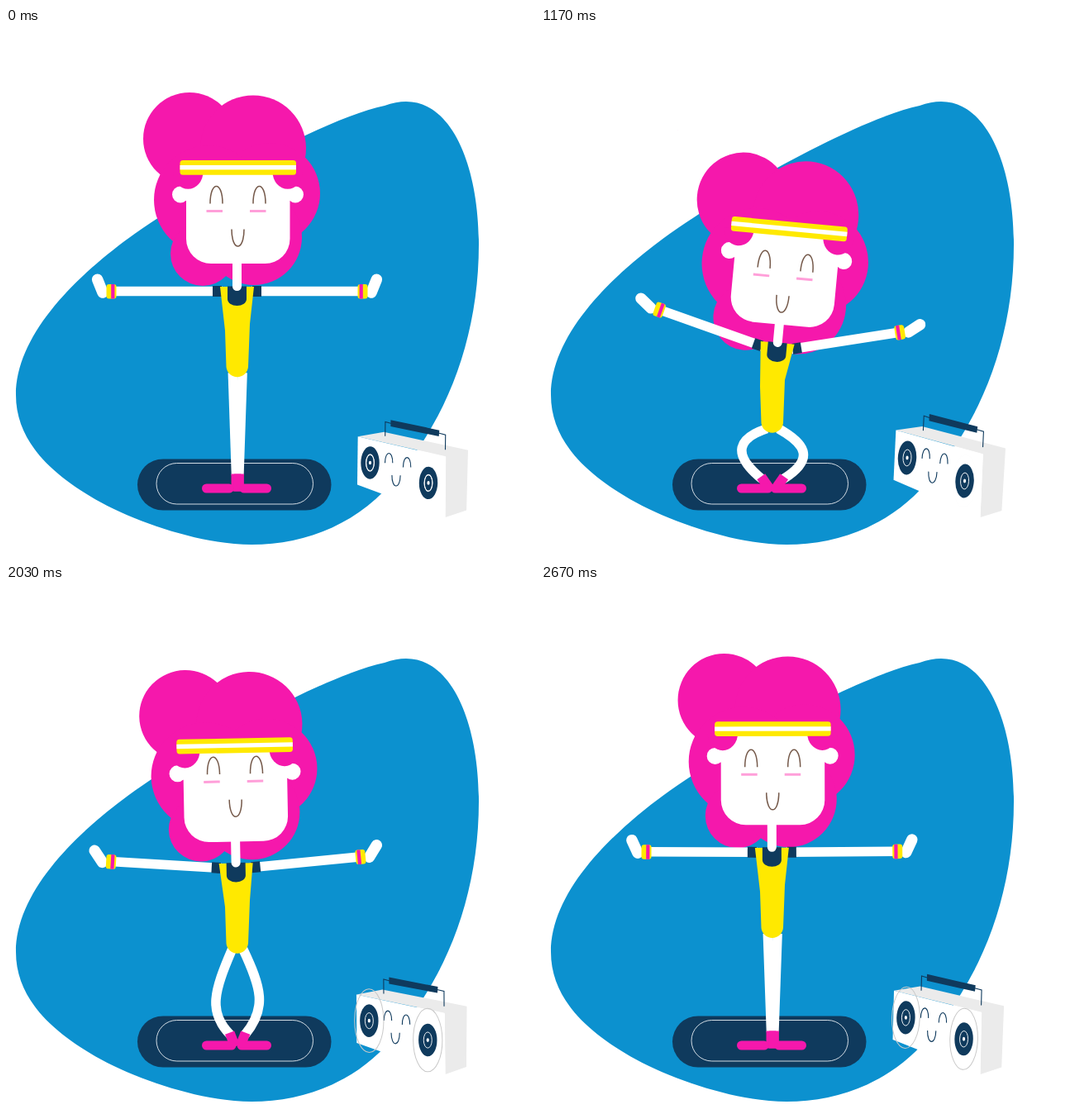
An HTML page that plays this animation: 640 px wide and 640 px high, repeating every 2730 ms.

```html
<!DOCTYPE html>
<html lang="en">
<head>
<meta charset="utf-8">
<title>Plié workout</title>
<style>
  html, body { margin: 0; width: 100%; height: 100%; overflow: hidden; background: #fff; }
  svg { display: block; width: 100vw; height: 100vh; }
  .pink { fill: #f518ac; }
  .navy { fill: #0f3a5d; }
  .yellow { fill: #ffe900; }
  .white { fill: #fff; }
  .line { fill: none; }
  .brown { stroke: #75594a; stroke-width: 1.5; }
  .thin { stroke: #0f3a5d; stroke-width: 1.1; }
  .limb { stroke: #fff; stroke-width: 11.5; fill: none; }
  .shoe { stroke: #f518ac; fill: none; }
</style>
</head>
<body>
<svg viewBox="0 0 640 640">
  <defs>
    <path id="eye" class="line" d="M0 21C0 -7 15 -7 15 21"/>
    <g id="speaker">
      <ellipse class="navy" rx="11.2" ry="20"/>
      <ellipse class="line" rx="5" ry="9.7" stroke="#fff" stroke-width=".9"/>
      <ellipse class="white" rx="1.6" ry="2.4"/>
      <ellipse id="ring" class="line"/>
    </g>
    <g id="arm">
      <path class="limb" d="M262 318.5H127"/>
      <rect class="navy" x="250" y="312" width="11" height="13"/>
      <path id="hand" d="M117 320H100" stroke="#fff" stroke-width="13.5" stroke-linecap="round"/>
      <rect class="yellow" x="121.5" y="310" width="12" height="17.5" rx="3"/>
      <rect class="pink" x="127.2" y="310" width="4.2" height="17.5"/>
    </g>
    <g id="side">
      <g class="white"><circle cx="211" cy="201.5" r="10"/><rect x="211" y="193" width="12" height="16"/></g>
      <path class="pink" d="M202 174a18 20.5 0 0 0 36.5 0Z"/>
    </g>
  </defs>

  <rect class="white" width="640" height="640"/>
  <path fill="#0c91cf" d="M484 89C540 89 572 168 572 262C572 372 535 470 474 541C430 598 365 625 297 625C240 625 165 601 115 574C55 541 12 500 12 444C12 362 104 281 186 228.5C250 186 390 108 458 94Q472 89 484 89Z"/>
  <rect class="navy" x="159" y="521.5" width="234.5" height="62" rx="31"/>
  <rect class="line" x="182" y="526.5" width="189.5" height="49.5" rx="24.7" stroke="#e8eef2" stroke-width=".9"/>

  <g id="radio">
    <path fill="#ebebeb" d="M424.5 494L456 488L558 509L557 583L531.5 592L531 517Z"/>
    <path class="white" d="M424.5 494L531.3 517.5L531.5 592L424.5 553Z"/>
    <path class="line thin" d="M457.5 493V475.5L465 477.5M522 488.5L530.5 490.5V509"/>
    <path class="navy" d="M464 473L523 485L522.5 492.5L464 481Z"/>
    <path class="line thin" d="M457.7 526C457.7 510 467 510 467 526M479.7 531C479.7 515 489 515 489 531M466.3 541C466.3 558.5 476.5 558.5 476.5 541"/>
    <use href="#speaker" x="439.7" y="526"/>
    <use href="#speaker" x="510.5" y="550"/>
  </g>

  <g id="legs"></g>

  <g class="upper">
    <g class="head">
      <g id="hair" class="pink">
        <circle cx="222" cy="134" r="56"/>
        <circle cx="299" cy="145.5" r="64"/>
        <circle cx="319" cy="200" r="61"/>
        <circle cx="245" cy="208" r="66"/>
        <circle cx="238" cy="273" r="39"/>
        <circle cx="300" cy="253" r="58"/>
      </g>
    </g>
    <use href="#arm"/>
    <use href="#arm" transform="translate(559 0) scale(-1 1)"/>
  </g>

  <path id="suit" class="yellow"/>

  <g class="upper">
    <path class="navy" d="M268 312.5V328a11.5 8 0 0 0 23 0V312.5Z"/>
    <path d="M279.5 270V312.5" stroke="#fff" stroke-width="11" stroke-linecap="round"/>
    <g class="head">
      <path class="white" d="M218 168H343.5V255a30 30 0 0 1 -30 30H248a30 30 0 0 1 -30 -30Z"/>
      <use href="#side"/>
      <use href="#side" transform="translate(561 0) scale(-1 1)"/>
      <rect class="yellow" x="210.5" y="160" width="140.5" height="17.7" rx="3.5"/>
      <rect class="white" x="210.5" y="166" width="140.5" height="5.4"/>
      <g id="face">
        <g class="brown">
          <use href="#eye" x="247" y="191"/>
          <use href="#eye" x="299" y="191"/>
          <path class="line" d="M273 243C273 270.5 288 270.5 288 243"/>
        </g>
        <path d="M242.5 221H262M295 221H314.5" stroke="#ff9fd9" stroke-width="3"/>
      </g>
    </g>
  </g>
</svg>
<script>
const LOOP = 2730, HALF = LOOP / 2, BEAT = HALF / 2, TAU = 2 * Math.PI;
const $ = s => document.querySelector(s);
const clamp = (v, a = 0, b = 1) => Math.min(b, Math.max(a, v));
const mix = (a, b, k) => a + (b - a) * k;
const wave = (t, period) => Math.sin(TAU * t / period);
const set = (el, attrs) => { for (const k in attrs) el.setAttribute(k, attrs[k]); };
const move = (el, transform) => set(el, { transform });

// Cubic ease in and out between two times.
function ease(t, from, to) {
  const u = clamp((t - from) / (to - from));
  return u < 0.5 ? 4 * u ** 3 : 1 - 4 * (1 - u) ** 3;
}

// One stretch upwards, then one squat, in each half of the loop.
function bodyY(t) {
  const p = (t + LOOP) % HALF;
  const stretch = p < 570 ? Math.sin(Math.PI * p / 570) ** 2 : 0;
  return 84 * (ease(p, 530, 860) - ease(p, 1045, 1390)) - 22 * stretch;
}

const SVG = 'http://www.w3.org/2000/svg';
const uppers = document.querySelectorAll('.upper'), heads = document.querySelectorAll('.head');

function addLegPart(className, attrs) {
  const el = document.createElementNS(SVG, 'path');
  set(el, { class: className, ...attrs });
  return $('#legs').appendChild(el);
}
const legs = [-1, 1].map(side => ({ side, leg: addLegPart('limb', {}) }));
for (const l of legs) {
  l.sock = addLegPart('shoe', { 'stroke-width': 12 });
  l.foot = addLegPart('shoe', { 'stroke-width': 11, 'stroke-linecap': 'round' });
}

function drawLegs(y, lean) {
  const bend = clamp((y - 6) / 78) ** 0.35, hip = 417 + y;
  const k = (a, b) => mix(a, b, bend);
  for (const { side, leg, sock, foot } of legs) {
    const px = d => 280.2 + side * d;
    const hx = px(k(5.9, 7)), ax = px(k(1.7, 14)), ay = k(541, 546), dip = 4 * side * lean;
    const knee = (part, out, down) =>
      `${k(mix(hx, ax, part), px(out))} ${k(mix(hip, ay, part), down + dip)}`;
    set(leg, { d: `M${hx} ${hip}C${knee(1 / 3, 43, 499)} ${knee(2 / 3, 55, 517)} ${ax} ${ay}` });
    set(sock, { d: `M${px(k(1.7, 4))} ${k(560.5, 557)}L${px(k(1.7, 15))} ${k(539.5, 543)}` });
    set(foot, { d: `M${279 + side * 36.5} 557H${279 + side * k(9, 4)}` });
  }
}

function drawSuit(y, tilt) {
  const a = tilt * TAU / 360, c = Math.cos(a), s = Math.sin(a);
  const top = x => `${280 + (x - 280) * c + 72 * s} ${385 + y + (x - 280) * s - 72 * c}`;
  set($('#suit'), { d: `M${top(259)}L265 ${366 + y}L266.5 ${410 + y}a13.3 13.3 0 0 0 26.5 0L295 ${358 + y}L${top(300)}Z` });
}

function drawRadio(t) {
  const deg = 0.3 - 2.9 * wave(t - 30, HALF), squash = 0.016 + 0.04 * wave(t, BEAT);
  move($('#radio'), `translate(532 592) scale(1 ${1 - squash}) rotate(${deg}) translate(-532 -592)`);
  const p = t % BEAT, ry = 10.4 + 0.0425 * p;
  set($('#ring'), {
    rx: ry * 0.455, ry,
    stroke: ry < 20 ? '#fff' : '#c9c9c9',
    opacity: clamp((Math.abs(p - 528) - 38) / 55)
  });
}

function draw(t) {
  const y = bodyY(t), lean = t < HALF ? 1 : -1;
  const depth = clamp(y / 84);
  const tilt = lean * 7.4 * depth ** 1.5;
  // Hair and face trail behind the body.
  const lag = -1.7 * (bodyY(t + 5) - bodyY(t - 5));
  const squash = 0.0014 * depth * (y - bodyY(t - 150));
  uppers.forEach(g => move(g, `translate(0 ${y}) rotate(${tilt} 280 385)`));
  heads.forEach(g => move(g, `translate(0 ${7 * depth})`));
  move($('#hair'), `translate(0 ${169 + lag * depth}) scale(1 ${1 - squash}) translate(0 -169)`);
  move($('#face'), `translate(0 ${lag})`);
  const raise = y < 0 ? 0.43 * y : 0.22 * Math.max(0, y - 3);
  move($('#arm'), `translate(260 318.5) rotate(${raise}) scale(${1 - 0.018 * depth} 1) translate(-260 -318.5)`);
  move($('#hand'), `rotate(${68 - 0.65 * y} 117 320)`);
  drawLegs(y, lean);
  drawSuit(y, tilt);
  drawRadio(t);
}

const start = performance.now();
function tick() {
  draw((performance.now() - start) % LOOP);
  requestAnimationFrame(tick);
}
tick();
</script>
</body>
</html>
```
